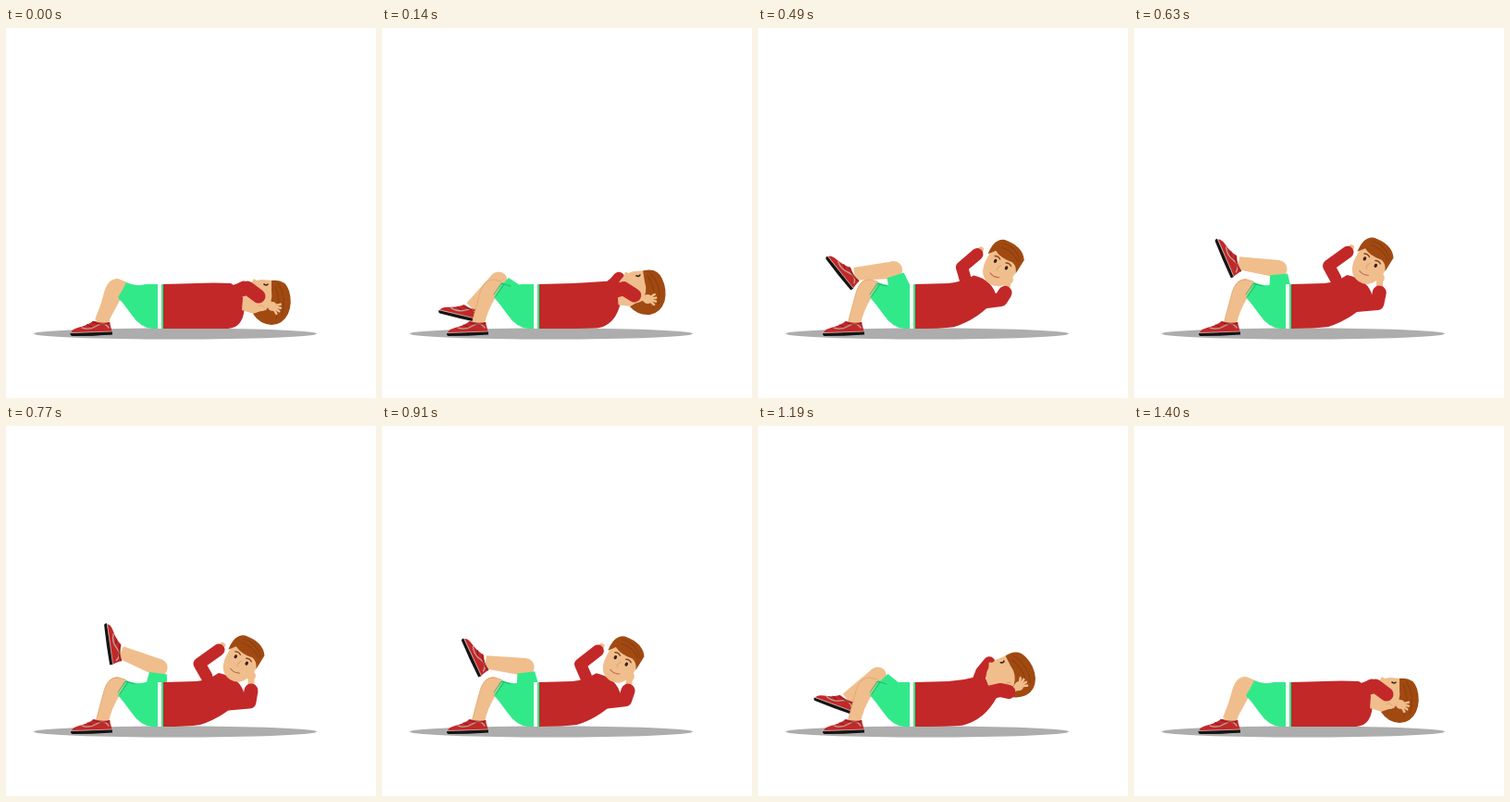
Write an HTML page with a canvas that moves like this. It is 400 px wide and 400 px high and loops after 1470 ms.

```html
<!DOCTYPE html>
<html lang="en">
<head>
<meta charset="utf-8">
<title>Sit-ups</title>
<style>
html, body { margin: 0; width: 100%; height: 100%; overflow: hidden; background: #fff; }
canvas { display: block; width: 400px; height: 400px; }
</style>
</head>
<body>
<canvas id="stage" width="400" height="400"></canvas>
<script>
const ctx = document.getElementById('stage').getContext('2d');
const STEP = 70, STEPS = 21;
const SKIN = '#f0be8c', SHADE = '#dca673', RED = '#c32828', GREEN = '#32e98a',
      HEM = '#22b269', HAIR = '#a04a12', STRAND = '#8d3d0d', DARK = '#3a2015';

const clamp = v => Math.max(0, Math.min(1, v));
const rad = degrees => degrees * Math.PI / 180;
const smooth = k => k * k * (3 - 2 * k);
const early = k => 1 - (1 - k) ** 2.5;
const mix = (a, b, k) => a + (b - a) * k;
const polar = ([x, y], r, degrees) => [x + r * Math.cos(rad(degrees)), y + r * Math.sin(rad(degrees))];

function fill(color, d) {
  ctx.fillStyle = color;
  ctx.fill(new Path2D(d));
}

function stroke(color, width, d) {
  ctx.strokeStyle = color;
  ctx.lineWidth = width;
  ctx.stroke(new Path2D(d));
}

function limb(color, width, ...points) {
  stroke(color, width, 'M' + points.join(' L'));
}

function ellipse(color, x, y, rx, ry) {
  ctx.fillStyle = color;
  ctx.beginPath();
  ctx.ellipse(x, y, rx, ry, 0, 0, Math.PI * 2);
  ctx.fill();
}

function at([x, y], degrees, scale, draw) {
  ctx.save();
  ctx.translate(x, y);
  ctx.rotate(rad(degrees));
  ctx.scale(scale, scale);
  draw();
  ctx.restore();
}

function taper(color, [x1, y1], r1, [x2, y2], r2) {
  const a = Math.atan2(y2 - y1, x2 - x1), nx = -Math.sin(a), ny = Math.cos(a);
  fill(color, `M${x1 + nx * r1},${y1 + ny * r1} L${x2 + nx * r2},${y2 + ny * r2}
    L${x2 - nx * r2},${y2 - ny * r2} L${x1 - nx * r1},${y1 - ny * r1} Z`);
}

function shoe() {
  fill(RED, 'M-8,-1 Q1,2 9,0 Q10,5 12,11 L-32,12 Q-32,8 -24,6 Q-15,4 -8,-1 Z');
  stroke('#bba7a0', 1.3, 'M-21,6 Q-13,9 -5,4 T8,6');
  stroke('#8d1d1e', 1, 'M-15,3 L-10,5 M-9,0 Q0,4 9,1');
  fill('#151515', 'M-33,12 L12,10 L12,13.5 Q-10,15 -31,15 Q-33,15 -33,12 Z');
  stroke('#d8d0cd', .7, 'M-32,11.5 L12,10');
}

// The thigh swings around the hip while the shin and foot fold up with it.
function movingLeg(lift) {
  const hip = [160, 303];
  const thighAngle = 209 + 68 * lift, thighLength = 46 - 4 * lift;
  const knee = polar(hip, thighLength, thighAngle);
  const ankle = polar(knee, 41 + 3 * lift, 115 + 87 * lift ** .85);
  ellipse(SKIN, ...knee, 9.5, 9.5);
  taper(SKIN, knee, 9.5, ankle, 7);
  taper(GREEN, polar(hip, thighLength - 6, thighAngle), 9.5, hip, 15);
  at(ankle, 84 * lift, 1, shoe);
}

function plantedLeg(outlined) {
  fill(SKIN, 'M97,319 L106,286 Q110,271 121,271 L131,275 L123,291 Q114,305 111,320 Z');
  if (outlined) stroke(SHADE, .8, 'M98,316 L106,286 Q110,272 121,272 L129,274');
  at([103, 318], 0, 1, shoe);
  fill(GREEN, `M130,275 Q140,280 151,277 L170,277 L170,325 L158,325
    Q145,324 135,309 Q128,299 121,291 Q126,284 130,275 Z`);
  if (outlined) stroke(HEM, .9, 'M123,290 L132,277 M121,288 L129,276 L139,279');
  fill('#fff', 'M164,277 h4 v48 h-4 Z');
}

function hand(wrist, palm) {
  const angle = Math.atan2(palm[1] - wrist[1], palm[0] - wrist[0]) * 180 / Math.PI;
  limb(SKIN, 7, wrist, palm);
  for (let i = 0; i < 4; i++) limb(SKIN, 2.6, palm, polar(palm, 9, angle - 50 + i * 25));
  ellipse(SKIN, ...palm, 5, 5);
}

function profileHead() {
  fill(SKIN, 'M5,-24 L-9,-25 L-14,-24 L-17,-26 L-20,-21 Q-29,-15 -29,-5 L-30,8 L-17,12 L6,16 Z');
  fill(HAIR, `M2,-24 Q17,-26 21,-13 Q25,0 20,12 Q14,24 2,24
    Q-11,23 -18,12 Q-11,9 -4,8 Q4,-1 2,-12 Z`);
  stroke(STRAND, 1, 'M9,-21 Q20,-5 13,14 M6,-18 Q14,0 7,17');
  stroke(DARK, 1.6, 'M-6,-20 Q-3,-18 -2,-20');
  ellipse(SKIN, -9, 5, 5, 4);
  stroke(SHADE, 1, 'M-12,4 Q-9,1 -6,5');
}

function frontHead() {
  fill(SKIN, 'M-15,-15 L15,-15 Q19,10 9,17 Q0,22 -8,17 Q-18,10 -15,-15 Z');
  fill(HAIR, 'M-17,-5 Q-20,-22 -10,-26 Q9,-30 17,-19 L17,-3 Q14,-10 8,-11 Q-4,-8 -12,-12 Z');
  stroke(STRAND, .9, 'M-10,-22 Q3,-26 14,-16 M-9,-18 Q3,-21 13,-14');
  for (const x of [-7, 6]) {
    stroke('#8a451d', 1.3, `M${x - 3},-7 Q${x},-9 ${x + 3},-7`);
    ellipse(DARK, x, -3, 1.5, 2);
  }
  stroke(SHADE, 1, 'M0,-2 Q-3,4 0,4');
  stroke('#b66b50', 1, 'M-5,10 Q0,12 5,9');
}

// Each point travels from its lying place to its curled place.
function upperBody(curl) {
  const s = smooth(curl), e = early(curl), facing = curl > .5;
  const path = (kx, ky) => (x1, y1, x2, y2) => [mix(x1, x2, kx), mix(y1, y2, ky)];
  const arc = path(s, e), slide = path(s, s), quick = path(e, e);

  const neck = arc(243, 276, 230, 267);
  const side = quick(258, 298, 258, 291);
  const corner = quick(258, 324, 238, 314);
  const bottom = quick(240, 325, 210, 323);
  const farWrist = arc(257, 280, 230, 242);
  const nearElbow = slide(261, 281, 263, 298);
  const nearWrist = arc(273, 290, 265, 286);

  if (facing) limb(SKIN, 6, farWrist, [farWrist[0] + 4, farWrist[1] - 5]);
  limb(RED, 13, arc(245, 285, 217, 271), arc(253, 282, 209, 257), farWrist);
  fill(RED, `M170,277 L206,276 Q${mix(206, neck[0], .5)},275 ${neck}
    Q${side[0] - 4},${neck[1] + 5} ${side} Q${corner} ${bottom}
    Q${bottom[0] - 14},325 170,325 Z`);
  fill(GREEN, 'M168,277 h2 v48 h-2 Z');
  at(arc(285, 297, 253, 256), facing ? 32 : -81 * curl, facing ? 1.08 : 1,
     facing ? frontHead : profileHead);
  hand(nearWrist, arc(288, 301, 265, 270));
  limb(RED, 15, slide(246, 286, 240, 300), nearElbow, nearWrist);
}

function draw(now) {
  const step = Math.floor(now / STEP) % STEPS;
  const lift = clamp(Math.min(step / 11, (19 - step) / 7.5));
  const curl = clamp((Math.min(step, STEPS - step) - 1) / 9);
  ctx.fillStyle = '#fff';
  ctx.fillRect(0, 0, 400, 400);
  ctx.lineCap = ctx.lineJoin = 'round';
  ellipse('#adadad', 183, 330.5, 153, 6);
  movingLeg(lift);
  plantedLeg(lift > .1);
  upperBody(curl);
}

const start = performance.now();
function tick() {
  draw(performance.now() - start);
  requestAnimationFrame(tick);
}
tick();
</script>
</body>
</html>
```
